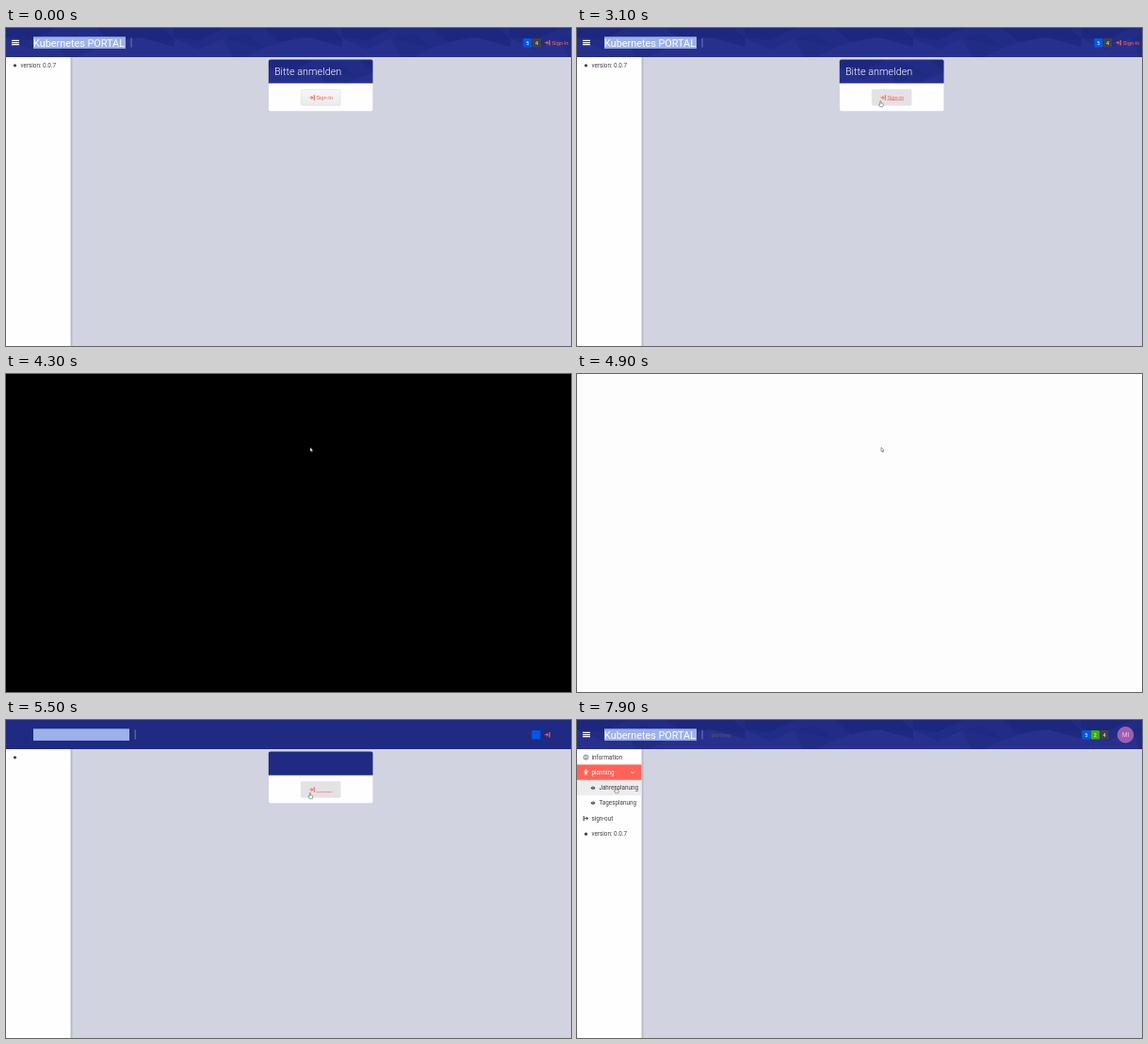
An HTML page that plays this animation: 600x338 px, repeating every 8 s.

```html
<!DOCTYPE html>
<html lang="de">
<head>
<meta charset="utf-8">
<title>Portal sign-in</title>
<style>
  html, body { margin: 0; width: 100%; height: 100%; overflow: hidden; background: #d2d3e0; }
  svg { display: block; width: 100vw; height: 100vh; }
  text { font-family: Roboto, Arial, sans-serif; font-size: 6.33px; fill: #424242; white-space: pre; }
  .title { font-size: 10.85px; fill: #fff; }
  .light { font-weight: 300; }
  .link { font-size: 5.8px; fill: #ff6358; }
  .crumb { font-size: 5.42px; fill: #585b68; }
  .badge { font-size: 5.42px; fill: #fff; text-anchor: middle; }
</style>
</head>
<body>
<svg viewBox="0 0 600 338" preserveAspectRatio="none">
  <defs>
    <pattern id="facets" width="178.5" height="31" patternUnits="userSpaceOnUse">
      <rect width="179" height="31" fill="#212c86"/>
      <path d="M0 11L27 23L52 11L96 21L130 10L178.5 13V31H0Z" fill="#293590" opacity=".65"/>
      <path d="M0 0H54L26 13L0 10ZM95 0H166L178.5 11V20L142 10L112 15Z" fill="#1b2579" opacity=".7"/>
      <path d="M52 11L74 5L96 21L76 31H62Z" fill="#1d287e" opacity=".6"/>
    </pattern>
    <pattern id="cardFacets" href="#facets" patternTransform="translate(278.5 32)"/>
    <linearGradient id="buttonFill" x2="0" y2="1">
      <stop stop-color="#f7f6f7"/><stop offset="1" stop-color="#ebeaec"/>
    </linearGradient>
    <linearGradient id="edge">
      <stop stop-color="#9a9bac" stop-opacity=".65"/><stop offset="1" stop-color="#9a9bac" stop-opacity="0"/>
    </linearGradient>
    <g id="enter">
      <path d="M0 0H3.2M1.7 -1.6L3.5 0L1.7 1.6" fill="none" stroke="#ff6358" stroke-width="1"/>
      <path d="M4.9 -2.7V2.7" stroke="#ff6358" stroke-width="1.2"/>
    </g>
    <g id="eye">
      <path d="M-2.5 0Q0 -3.3 2.5 0Q0 3.3 -2.5 0Z" fill="#424242"/>
      <circle r=".65" cy="-.2" fill="#ddd"/>
    </g>
  </defs>

  <g id="page">
    <rect width="600" height="338" fill="#d2d3e0"/>
    <rect x="68.5" y="31" width="3" height="307" fill="url(#edge)"/>
    <rect y="31" width="68.5" height="307" fill="#fefdff"/>
    <rect id="header" width="600" height="31"/>

    <rect id="selection" x="29" y="9.3" height="12.6" fill="#9db1ec"/>
    <path id="divider" d="M0 10.5V20.5" stroke="#8990bd" stroke-width=".8"/>
    <g id="headerText">
      <path d="M6 13.4H14M6 15.5H14M6 17.6H14" stroke="#fff" stroke-width="1.25"/>
      <text class="title" x="29" y="19.5">Kubernetes PORTAL</text>
    </g>
    <g id="signInCrumbs">
      <text class="crumb" x="142.3" y="18">auth</text>
      <text class="crumb" x="165.5" y="18">sign-in</text>
    </g>
    <text id="planningCrumb" class="crumb" x="142.5" y="18">planning</text>
    <g id="badges"></g>

    <g id="guest">
      <use href="#enter" x="572.3" y="15.7"/>
      <text id="headerSignIn" class="link" x="579.8" y="17.8">Sign-In</text>
      <rect x="278.4" y="33.4" width="111.6" height="55.6" rx="2.2" fill="#c3c4d2"/>
      <rect x="278.8" y="33.6" width="110.8" height="55" rx="2" fill="#fefdff"/>
      <path id="cardHeader" d="M278.8 58.7V35.6Q278.8 33.6 280.8 33.6H387.6Q389.6 33.6 389.6 35.6V58.7Z"/>
      <text id="cardTitle" class="title light" x="284.9" y="49.8">Bitte anmelden</text>
      <rect id="button" x="313.3" y="65.4" width="41.8" height="16.8" rx="1.2" stroke="#dedce0" stroke-width=".6"/>
      <rect id="ring" x="318" y="68.4" width="32.8" height="11" rx="5.5" fill="#e9deda" stroke="#e9a49b" stroke-width=".6"/>
      <use href="#enter" x="322.4" y="74"/>
      <text id="buttonText" class="link" x="329.4" y="76">Sign-In</text>
      <path id="underline" d="M329.4 76.6H346.8" stroke="#ff6358" stroke-width=".6"/>
    </g>

    <g id="member">
      <circle cx="582.5" cy="15.7" r="8.3" fill="#a459b3" stroke="#c795d2" stroke-width=".5"/>
      <text x="582.5" y="17.9" text-anchor="middle" style="fill:#ead6ee">MI</text>
      <rect id="hover" width="68.5" height="16.4" fill="#edecee"/>
      <circle cx="9.5" cy="39.7" r="2.4" fill="none" stroke="#424242" stroke-width=".7"/>
      <path d="M9.5 38.1V38.8M9.5 39.4V41.2" stroke="#424242" stroke-width=".8"/>
      <text x="15.5" y="41.5">information</text>
      <rect id="selected" y="47.4" width="68.5" height="16.3" fill="#ff6358"/>
      <g id="planningIcon">
        <circle cx="9.5" cy="53.2" r=".9"/>
        <path d="M7 54.4H12V55.2L10.6 55.6V58.6H9.8V56.9H9.2V58.6H8.4V55.6L7 55.2Z"/>
      </g>
      <text id="planningText" x="15.5" y="57.8">planning</text>
      <path id="chevron" d="M57.3 55L59 56.7L60.7 55" fill="none" stroke-width=".9"/>
      <g id="submenu">
        <use href="#eye" x="17" y="72.2"/><text x="23.4" y="74.1">Jahresplanung</text>
        <use href="#eye" x="17" y="88.2"/><text x="23.4" y="90.2">Tagesplanung</text>
      </g>
      <g id="signOut">
        <path d="M7.2 101.9V107.3" stroke="#424242" stroke-width="1.1"/>
        <path d="M8 104.6H11.5M10 103L11.7 104.6L10 106.2" fill="none" stroke="#424242" stroke-width=".9"/>
        <text x="15.5" y="106.6">sign-out</text>
      </g>
    </g>
    <g id="version">
      <circle cx="9.5" cy="39.8" r="1.6" fill="#424242"/>
      <text id="versionText" x="15.5" y="41.5">version: 0.0.7</text>
    </g>
  </g>

  <rect id="blank" width="600" height="338"/>
  <path id="arrow" d="M0 0V4.4L1 3.5L1.7 5.1L2.5 4.7L1.8 3.2H3.1Z" fill="#fff" stroke="#333" stroke-width=".45"/>
  <path id="hand" d="M-.6 -2.3Q0 -3 .5 -2.3V0L2.3 .4Q2.9 .6 2.8 1.4L2.3 3.7H-.8L-2.1 1.3Q-1.8 .5 -.6 1.3Z" fill="#fff" stroke="#444" stroke-width=".5"/>
</svg>
<script>
const LOOP = 8000, STEP = 100;
const $ = id => document.getElementById(id);
const show = (id, on) => $(id).setAttribute('display', on ? 'inline' : 'none');
const set = (id, name, value) => $(id).setAttribute(name, value);

// Cursor stops: time, x, y
const stops = [
  [2100, 290, 25], [2300, 275, 58], [2500, 278, 104], [2650, 296, 117],
  [2800, 314, 96], [2900, 321, 78], [3200, 323, 78], [6400, 323, 78],
  [6700, 232, 98], [7000, 84, 86], [7200, 43, 56], [7500, 43, 57], [7800, 41.5, 74]
];

function cursorAt(t) {
  const next = stops.findIndex(s => s[0] > t);
  if (next < 0) return stops[stops.length - 1].slice(1);
  const [t0, x0, y0] = stops[next - 1], [t1, x1, y1] = stops[next];
  const p = (t - t0) / (t1 - t0), e = p * p * (3 - 2 * p);
  return [x0 + (x1 - x0) * e, y0 + (y1 - y0) * e];
}

const badge = (label, x, color) =>
  `<rect x="${x}" y="11" width="9.2" height="9.4" rx="1" fill="${color}"/>` +
  `<text class="badge" x="${x + 4.6}" y="17.7">${label}</text>`;

function badges(loaded, member) {
  if (!loaded) return badge('', 558.3, '#0058e9');
  if (!member) return badge(5, 549.2, '#0058e9') + badge(4, 558.8, '#424242');
  return badge(5, 536.2, '#0058e9') + badge(2, 545.7, '#37b400') + badge(4, 555.3, '#424242');
}

function render(t) {
  const black = t >= 4300 && t < 4900, white = t >= 4900 && t < 5500;
  const loaded = t < 5500 || t >= 5700;
  const member = t >= 6100, open = t >= 7400;
  const overButton = t >= 2900 && t < 6100;
  const pressed = t >= 3800 && t < 4300;

  show('blank', black || white);
  set('blank', 'fill', black ? '#000' : '#fdfdfe');
  show('page', !black && !white);

  set('header', 'fill', loaded ? 'url(#facets)' : '#1f2a82');
  set('cardHeader', 'fill', loaded ? 'url(#cardFacets)' : '#1f2a82');
  for (const id of ['headerText', 'headerSignIn', 'cardTitle', 'buttonText', 'versionText']) show(id, loaded);
  set('selection', 'width', loaded ? 98 : 102);
  set('divider', 'transform', `translate(${loaded ? 133 : 137.2} 0)`);
  $('badges').innerHTML = badges(loaded, member);
  show('signInCrumbs', t >= 3900 && t < 4300 || t >= 5700 && !member);
  show('planningCrumb', open);

  show('guest', !member);
  set('button', 'fill', overButton ? '#e4e2e5' : 'url(#buttonFill)');
  show('ring', pressed);
  show('underline', overButton);

  show('member', member);
  const overPlanning = t >= 7200 && !open, overYear = t >= 7700;
  show('hover', overPlanning || overYear);
  set('hover', 'y', overYear ? 63.7 : 47.4);
  show('selected', open);
  const ink = open ? '#fff' : '#424242';
  set('planningIcon', 'fill', ink);
  set('chevron', 'stroke', ink);
  $('planningText').style.fill = ink;
  show('submenu', open);
  set('signOut', 'transform', `translate(0 ${open ? 0 : -32.6})`);
  set('version', 'transform', `translate(0 ${!member ? 0 : open ? 81.4 : 48.8})`);

  const visible = t >= stops[0][0];
  const link = overButton && !black && !(white && t < 5300) || t >= 7200;
  show('arrow', visible && !link);
  show('hand', visible && link);
  if (visible) {
    const [x, y] = cursorAt(t);
    set('arrow', 'transform', `translate(${x} ${y})`);
    set('hand', 'transform', `translate(${x} ${y + (member ? 0 : 2)})`);
  }
}

const start = performance.now();
function frame() {
  const t = (performance.now() - start) % LOOP;
  render(Math.floor(t / STEP) * STEP);
  requestAnimationFrame(frame);
}
frame();
</script>
</body>
</html>
```
